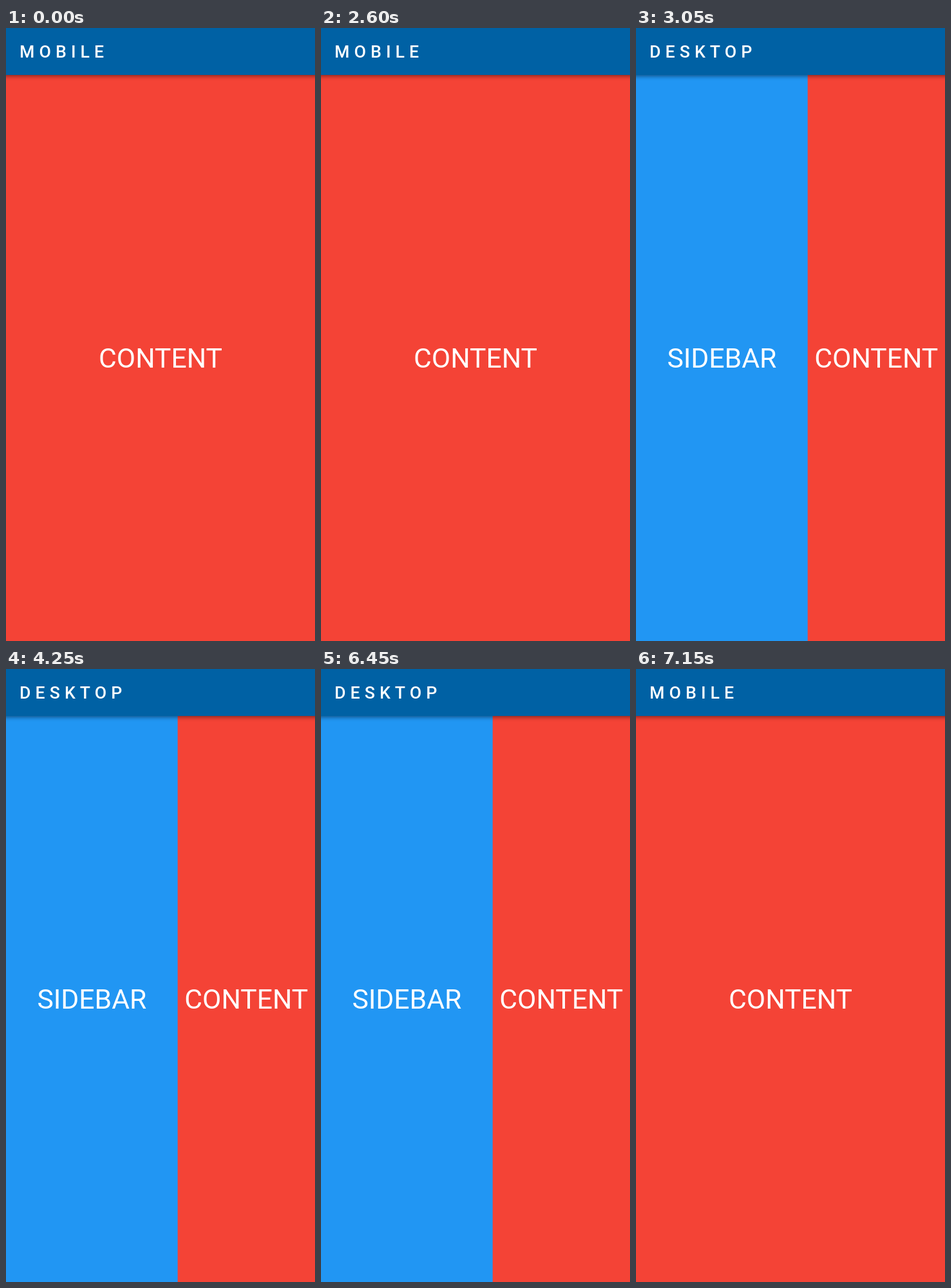
Animation of 480x953 px, one loop 8000 ms. Source, as an HTML page:

```html
<!DOCTYPE html>
<html lang="en">
<head>
<meta charset="utf-8">
<title>Responsive layout</title>
<style>
  html, body { margin: 0; width: 100%; height: 100%; overflow: hidden; background: #f44336; }
  svg { display: block; width: 100%; height: 100%; }
  text { font-family: Roboto, sans-serif; fill: #fff; }
  .label { font-size: 42.67px; text-anchor: middle; }
  #title { font-size: 26.67px; font-weight: 500; letter-spacing: 7.11px; }
  #bar { fill: #0061a4; filter: drop-shadow(0 2px 3px rgba(0, 0, 0, .45)); }
</style>
</head>
<body>
<svg viewBox="0 0 480 953">
  <rect width="480" height="953" fill="#f44336"/>
  <g id="sidebar">
    <rect y="73" width="266.67" height="880" fill="#2196f3"/>
    <text class="label" x="133.33" y="528">SIDEBAR</text>
  </g>
  <text class="label" id="content" y="528">CONTENT</text>
  <rect id="bar" x="-10" y="-10" width="500" height="83"/>
  <text id="title" x="21" y="46"></text>
</svg>
<script>
  const LOOP = 8000, DESKTOP_START = 2700, DESKTOP_END = 6700;
  const [sidebar, content, title] =
    ['sidebar', 'content', 'title'].map(id => document.getElementById(id));
  let shown = null;

  function setLayout(desktop) {
    if (desktop === shown) return;
    shown = desktop;
    sidebar.setAttribute('visibility', desktop ? 'visible' : 'hidden');
    content.setAttribute('x', desktop ? 373.33 : 240);
    title.textContent = desktop ? 'DESKTOP' : 'MOBILE';
  }

  function draw() {
    const t = performance.now() % LOOP;
    setLayout(t >= DESKTOP_START && t < DESKTOP_END);
    requestAnimationFrame(draw);
  }
  draw();
</script>
</body>
</html>
```
